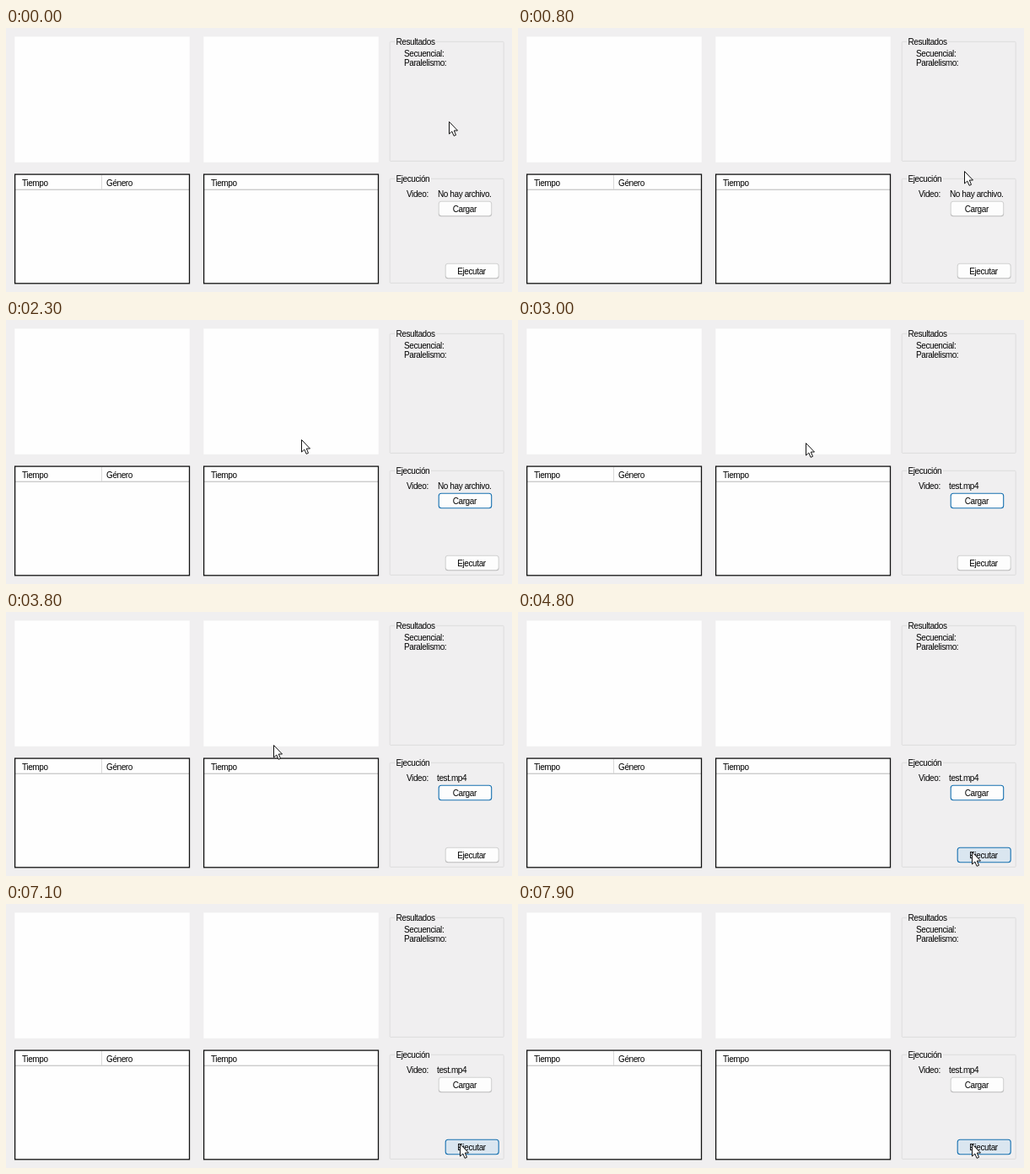
Write an HTML page with a canvas that moves like this. It is 600 px wide and 314 px high and loops after 8 s.

```html
<!DOCTYPE html>
<html lang="es">
<head>
<meta charset="utf-8">
<style>
html, body { margin: 0; width: 600px; height: 314px; overflow: hidden; background: #f0eff0; }
canvas { display: block; }
</style>
</head>
<body>
<canvas id="stage" width="600" height="314"></canvas>
<script>
const ctx = document.getElementById('stage').getContext('2d');
const LOOP = 8000;
const BLUE = '#1670b0';

// time, x, y of the pointer tip
const PATH = [
  [0, 525, 111], [400, 525, 111], [1100, 531, 208], [1700, 531, 208],
  [2200, 350, 142], [2800, 350, 142], [3400, 317, 158], [3900, 317, 158],
  [4650, 538, 285], [LOOP, 538, 285]
];

// fill, edge, bottom edge
const STYLES = {
  normal: ['#fdfdfd', '#d2d2d2', '#b8b8b8'],
  focus: ['#fdfdfd', BLUE, BLUE],
  hover: ['#dae6f0', BLUE, BLUE],
  pressed: ['#f2f1f2', '#e3e2e3', '#e3e2e3']
};

function pointerAt(t) {
  let i = 1;
  while (i < PATH.length - 1 && t >= PATH[i][0]) i++;
  const [t0, x0, y0] = PATH[i - 1], [t1, x1, y1] = PATH[i];
  const p = Math.min(1, (t - t0) / (t1 - t0));
  const e = p * p * (3 - 2 * p);
  return [x0 + (x1 - x0) * e, y0 + (y1 - y0) * e];
}

function rect(x, y, w, h, color) {
  ctx.fillStyle = color;
  ctx.fillRect(x, y, w, h);
}

function text(s, x, y, align = 'left') {
  ctx.font = '10px "Liberation Sans", Arial, sans-serif';
  ctx.letterSpacing = '-0.4px';
  ctx.textAlign = align;
  ctx.fillStyle = '#000';
  ctx.fillText(s, x, y);
}

function group(title, x, y, w, h, gap) {
  ctx.lineWidth = 1;
  ctx.strokeStyle = '#dddcdd';
  ctx.beginPath();
  ctx.roundRect(x + 0.2, y + 0.3, w, h, 1);
  ctx.stroke();
  rect(x + 6, y - 4, gap, 9, '#f0eff0');
  text(title, x + 7.5, y + 4);
}

function list(x, columns) {
  rect(x, 174, 208, 130, '#fefefe');
  rect(x + 1, 191.7, 206, 1, '#b8b8b8');
  columns.forEach(([label, dx], i) => {
    if (i) rect(x + dx - 6, 175, 1, 17, '#d8d8d8');
    text(label, x + dx, 188);
  });
  ctx.strokeStyle = '#111';
  ctx.lineWidth = 1.3;
  ctx.strokeRect(x + 0.6, 174.1, 206.9, 129.7);
}

function button(label, x, y, w, state) {
  const [fill, edge, base] = STYLES[state];
  const shade = ctx.createLinearGradient(0, y + 14, 0, y + 18);
  shade.addColorStop(0, edge);
  shade.addColorStop(1, base);
  ctx.beginPath();
  ctx.roundRect(x + 0.2, y + 0.3, w, 17.4, 3);
  ctx.fillStyle = fill;
  ctx.fill();
  ctx.strokeStyle = shade;
  ctx.lineWidth = 1.1;
  ctx.stroke();
  text(label, x + w / 2 - 0.5, y + 13, 'center');
}

function pointer(x, y) {
  ctx.save();
  ctx.translate(Math.round(x) + 0.5, Math.round(y) + 0.5);
  ctx.beginPath();
  ctx.moveTo(0, 0);
  for (const [px, py] of [[0, 14.5], [3.3, 11.5], [5.6, 16.8], [8, 15.8], [5.8, 10.5], [10, 10.5]]) ctx.lineTo(px, py);
  ctx.closePath();
  ctx.fillStyle = '#fff';
  ctx.fill();
  ctx.strokeStyle = '#111';
  ctx.lineWidth = 1;
  ctx.stroke();
  ctx.restore();
}

function inside(x, y, bx, by, bw) {
  return x >= bx && x <= bx + bw && y >= by && y <= by + 18;
}

function draw(t) {
  const [x, y] = pointerAt(t);
  rect(0, 0, 600, 314, '#f0eff0');
  rect(10.3, 10.3, 207.4, 149.5, '#fefefe');
  rect(234.3, 10.3, 207.4, 149.5, '#fefefe');
  list(10, [['Tiempo', 9], ['Género', 109]]);
  list(234, [['Tiempo', 9]]);

  group('Resultados', 455, 16, 135, 142, 49);
  text('Secuencial:', 472, 34);
  text('Paralelismo:', 472, 45);

  group('Ejecución', 455, 179, 135, 124, 43);
  text('Video:', 475, 201);
  if (t < 3000) text('No hay archivo.', 512, 201);
  else text('test.mp4', 511, 201);

  let load = 'normal';
  if (t >= 1300 && t < 1500) load = 'pressed';
  else if (t < 4000 && inside(x, y, 513, 206, 63)) load = 'hover';
  else if (t >= 1500 && t < 5200) load = 'focus';
  button('Cargar', 513, 206, 62.5, load);

  const run = inside(x, y, 521, 280, 63) ? 'hover' : 'normal';
  button('Ejecutar', 521, 280, 63, run);

  pointer(x, y);
}

const start = performance.now();
function tick() {
  draw((performance.now() - start) % LOOP);
  requestAnimationFrame(tick);
}
tick();
</script>
</body>
</html>
```
